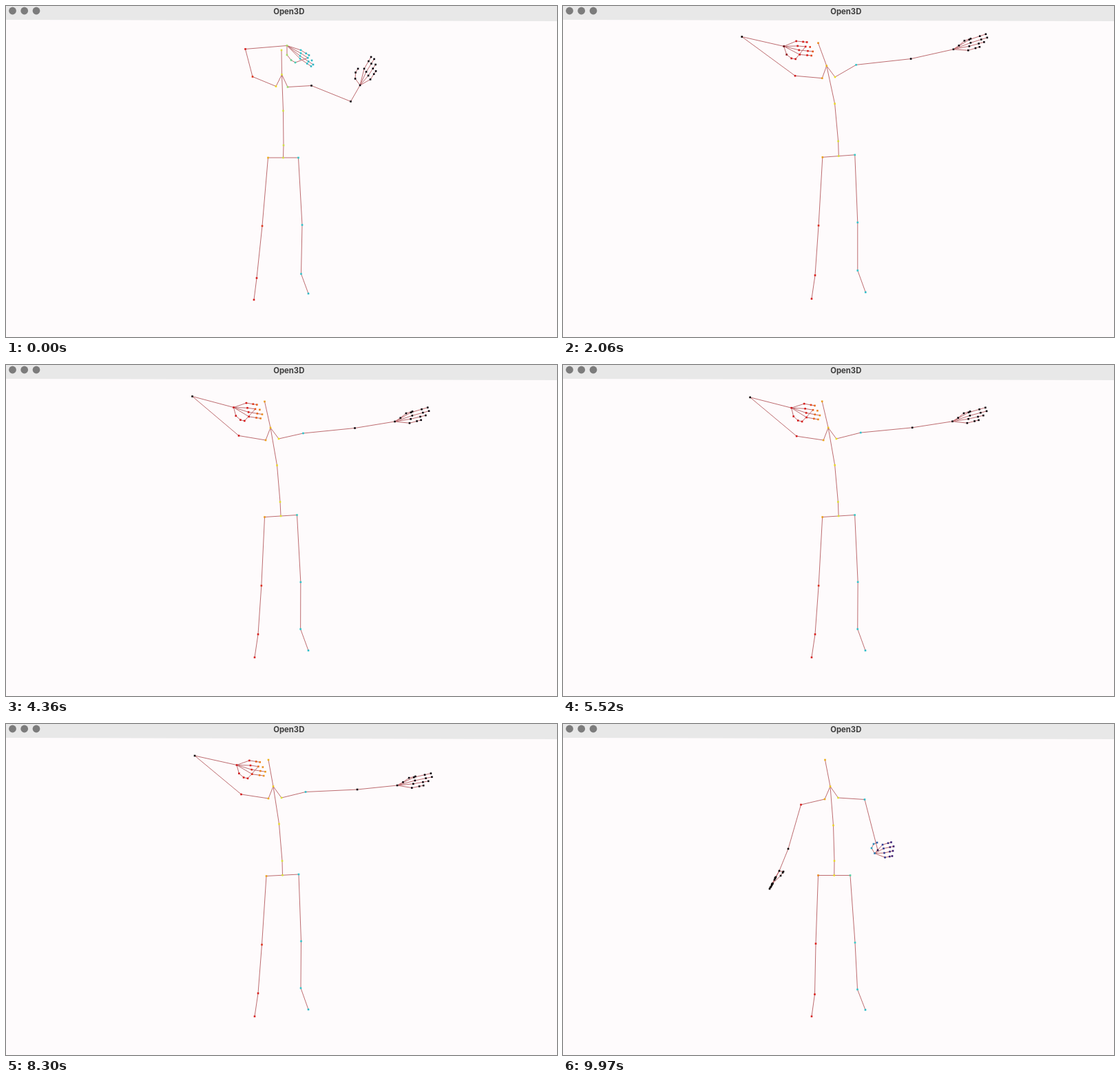
An HTML page with a canvas for the animation above (10 s loop, 800x480 px).

```html
<!DOCTYPE html>
<html lang="en">
<head>
<meta charset="utf-8">
<title>Open3D</title>
<style>
  html, body { margin: 0; width: 100%; height: 100%; overflow: hidden; background: #fefbfc; }
  canvas { display: block; }
</style>
</head>
<body>
<canvas id="stage" width="800" height="480"></canvas>
<script>
const ctx = document.getElementById('stage').getContext('2d');
const LOOP = 10000;

// Hand shapes relative to the wrist: three thumb joints, then base and tip of four fingers.
const rightRaised = [0, 13.5, 6, 21, 12, 24.5, 20, 6.5, 32, 14, 20, 11, 36, 21.5, 19, 15, 38, 27.5, 19, 19, 35, 30];
const rightOpen = [4, 12, 11, 17.5, 17, 18.5, 18, -7.5, 33.5, -6, 20, -.5, 38, 1, 22, 5.5, 42, 7.5, 23, 12, 40, 13.5];
const rightDown = [6, 1, 5, 2.5, 2, 7, -5, 9, -14, 26, -6, 10, -13, 24, -6, 11, -12, 23, -7, 13, -11, 21];
const leftRaised = [-7, -9.5, -6.5, -18.5, -3, -24, 6, -24, 16, -41, 9, -19.5, 20.5, -38, 12, -14, 22.5, -30, 15, -8.5, 23, -20.5];
const leftOpen = [8, -5.5, 16, -12.5, 25, -15.5, 23, -14, 47, -22, 25, -9.5, 49, -17, 23, -4.5, 44.5, -10.5, 21.5, 1.5, 38, -3.5];
const leftDown = [-4.5, -7.5, -1.5, -13.5, 3.5, -15.5, 11.5, -12.5, 24, -16, 13, -7, 27.5, -10, 14, -.5, 26.5, -3.5, 15, 6, 25.5, 4];

function turn(hand, degrees) {
  const c = Math.cos(degrees * Math.PI / 180), s = Math.sin(degrees * Math.PI / 180);
  return hand.map((v, i) => i % 2 ? hand[i - 1] * s + v * c : v * c - hand[i + 1] * s);
}

// Joints are [x, y, colour shift]; a joint missing from a pose moves straight through it.
const poses = [
  [0, {
    head: [400, 64], neck: [400.5, 99.5], chest: [402.5, 152], belly: [403, 202],
    rCollar: [392, 116.5], rShoulder: [358, 102.5], rElbow: [347.5, 62.5], rWrist: [408, 57.5],
    lCollar: [409, 117.5], lShoulder: [443.5, 115.5, 70], lElbow: [500.5, 138.5], lWrist: [514, 115],
    rHip: [380.5, 220], rKnee: [372, 319], rAnkle: [364, 394.5], rToe: [360, 426],
    lHip: [424.5, 220], lKnee: [430, 317.5], lAnkle: [428.5, 388.5], lToe: [439, 417],
    rHand: rightRaised, lHand: leftRaised
  }],
  [1030, { rShoulder: [348, 94], rElbow: [346.5, 10] }],
  [1210, {
    head: [368.5, 55.5], neck: [382.5, 84], chest: [395.5, 139], belly: [400.5, 194],
    rCollar: [376.5, 102], rShoulder: [338, 85, -40], rElbow: [329, 2], rWrist: [386.5, 9.5],
    lCollar: [394.5, 101], lShoulder: [422, 79], lElbow: [494, 47.5], lWrist: [556, 13],
    rHip: [377.5, 217.5], rKnee: [371.5, 317], rAnkle: [366, 390.5], rToe: [361, 425],
    lHip: [424, 214.5], lKnee: [428, 313], lAnkle: [428, 384], lToe: [439.5, 416],
    rHand: rightOpen, lHand: leftOpen
  }],
  [1950, { rShoulder: [337, 101], rElbow: [259, 44], rWrist: [320, 58], lElbow: [505, 76], lWrist: [567, 62] }],
  [3090, {
    head: [373, 51.5], neck: [383, 90], chest: [393.5, 145], belly: [398.5, 198.5],
    rCollar: [376, 108], rShoulder: [337, 103.5], rElbow: [266.5, 50], rWrist: [327, 62.5],
    lCollar: [395.5, 105.5], lShoulder: [430, 93], lElbow: [506, 82], lWrist: [565.5, 70.5],
    rHip: [376, 221.5], rKnee: [370.5, 320], rAnkle: [366, 390.5], rToe: [361, 424],
    lHip: [423.5, 217.5], lKnee: [427.5, 315], lAnkle: [427.5, 383], lToe: [439, 414],
    rHand: rightOpen, lHand: leftOpen
  }],
  [4360, {
    head: [375.5, 53], neck: [384, 91], chest: [393.5, 145.5], belly: [398, 198.5],
    rCollar: [377, 109], rShoulder: [338, 102.5], rElbow: [270.5, 45.5], rWrist: [330.5, 61.5],
    lCollar: [396, 107], lShoulder: [431.5, 99], lElbow: [506.5, 91.5], lWrist: [564.5, 82],
    rHip: [375.5, 220.5], lHip: [422.5, 217.5],
    rHand: turn(rightOpen, 3.5), lHand: turn(leftOpen, 2)
  }],
  [6880, {
    head: [377, 52.5], neck: [386.5, 91], chest: [396, 145], belly: [401, 198.5],
    rCollar: [379.5, 109], rShoulder: [340.5, 104], rElbow: [273, 48.5], rWrist: [333, 63],
    lCollar: [398, 107], lShoulder: [433, 97], lElbow: [508, 90], lWrist: [566.5, 81.5],
    rHip: [378, 220.5], rKnee: [371.5, 320], lHip: [425, 217.5], lKnee: [428.5, 314.5],
    rHand: turn(rightOpen, 6), lHand: turn(leftOpen, 3)
  }],
  [8300, {
    head: [381, 52], neck: [388, 90.5], chest: [396.5, 145], belly: [401, 198.5],
    rCollar: [381, 108], rShoulder: [341.5, 102], rElbow: [274, 46], rWrist: [335, 59.5],
    lCollar: [400, 107], lShoulder: [435, 98.5], lElbow: [510, 95], lWrist: [568, 89],
    rHip: [378, 220.5], rKnee: [371.5, 320], rAnkle: [366, 390.5], rToe: [361, 424],
    lHip: [425, 218], lKnee: [428.5, 315], lAnkle: [428, 383], lToe: [439, 414],
    rHand: turn(rightOpen, 3), lHand: turn(leftOpen, 5.5)
  }],
  [8800, { rElbow: [274, 50], rWrist: [332, 66], lElbow: [512, 100], lWrist: [574, 104] }],
  [9300, { rShoulder: [343, 112], rElbow: [303, 140], rWrist: [325, 172], lElbow: [492, 135], lWrist: [508, 138] }],
  [9970, {
    head: [380.5, 52], neck: [388, 90.5], chest: [392.5, 147], belly: [394, 198.5],
    rCollar: [380, 109], rShoulder: [345.5, 117], rElbow: [327, 181, -30], rWrist: [314, 213, -20],
    lCollar: [399.5, 107], lShoulder: [438, 109.5], lElbow: [457, 183, 30], lWrist: [452.5, 187.5],
    rHip: [370.5, 219.5], rKnee: [367, 318.5], rAnkle: [365.5, 392], rToe: [361, 424],
    lHip: [417, 219.5], lKnee: [424, 317], lAnkle: [427.5, 385], lToe: [439, 414.5],
    rHand: rightDown, lHand: leftDown
  }]
];

const chains = [
  'head neck chest belly pelvis', 'rHip pelvis lHip',
  'neck rCollar rShoulder rElbow rWrist', 'neck lCollar lShoulder lElbow lWrist',
  'rHip rKnee rAnkle rToe', 'lHip lKnee lAnkle lToe'
].map(chain => chain.split(' '));

// Joint colour depends on the horizontal position.
const ramp = [
  [300, 10, 0, 0], [320, 90, 10, 15], [330, 205, 25, 30], [355, 220, 30, 25], [368, 235, 125, 30],
  [382, 235, 180, 30], [396, 235, 225, 40], [405, 200, 225, 80], [415, 90, 210, 150],
  [425, 50, 200, 205], [446, 40, 180, 195], [458, 45, 75, 165], [480, 60, 25, 110], [500, 12, 5, 12]
];

const tracks = {};
for (const [time, pose] of poses)
  for (const name in pose) (tracks[name] ||= []).push([time, pose[name]]);

const mix = (a, b, k) => a.map((v, i) => v + ((b[i] || 0) - v) * k);

function sample(keys, t) {
  const next = keys.findIndex(key => key[0] > t);
  if (next < 0) return keys[keys.length - 1][1];
  if (next === 0) return keys[0][1];
  const [t0, a] = keys[next - 1], [t1, b] = keys[next];
  return mix([a[0], a[1], ...(a.length > 2 ? a.slice(2) : [0])], b, (t - t0) / (t1 - t0));
}

const rampKeys = ramp.map(([x, ...rgb]) => [x, rgb]);

function dot([x, y, shift = 0]) {
  const legShift = y > 300 && x < 400 ? -14 : 0;
  ctx.fillStyle = `rgb(${sample(rampKeys, x + shift + legShift).map(Math.round)})`;
  ctx.fillRect(x - 1.3, y - 1.3, 2.6, 2.6);
}

function line(points) {
  ctx.beginPath();
  for (const [x, y] of points) ctx.lineTo(x, y);
  ctx.stroke();
}

function drawHand(wrist, shape, isRight) {
  const at = i => [wrist[0] + shape[2 * i], wrist[1] + shape[2 * i + 1], wrist[2]];
  const thumb = [at(0), at(1), at(2)];
  const fingers = [3, 5, 7, 9].map(i => {
    const base = at(i), tip = at(i + 1);
    return [base, mix(base.slice(0, 2), tip, .64).concat(wrist[2] || 0), tip];
  });
  // On the right hand the middle fingertip is loose and the thumb joins that finger.
  fingers.forEach((finger, i) => line([wrist, ...(isRight && i === 1 ? finger.slice(0, 2) : finger)]));
  line([wrist, ...thumb, ...(isRight ? [fingers[1][1]] : [])]);
  [thumb, ...fingers].flat().forEach(dot);
}

function drawWindowBar() {
  ctx.fillStyle = '#e8e8e8';
  ctx.beginPath();
  for (const [x, y] of [[0, 0], [800, 0], [800, 22], [0, 20]]) ctx.lineTo(x, y);
  ctx.fill();
  ctx.fillStyle = '#7c7c7c';
  for (const x of [9.5, 26.7, 44]) {
    ctx.beginPath();
    ctx.arc(x, 7, 5.4, 0, 7);
    ctx.fill();
  }
  ctx.fillStyle = '#3d3d3d';
  ctx.font = '700 11.3px Inter, sans-serif';
  ctx.textAlign = 'center';
  ctx.textBaseline = 'alphabetic';
  ctx.fillText('Open3D', 410.8, 12);
}

function frame(now) {
  const t = now % LOOP, body = {};
  for (const name in tracks) body[name] = sample(tracks[name], t);
  body.pelvis = mix(body.rHip.slice(0, 2), body.lHip, .5);

  ctx.fillStyle = '#fefbfc';
  ctx.fillRect(0, 0, 800, 480);
  ctx.strokeStyle = '#bd6c70';
  ctx.lineWidth = 1;
  for (const chain of chains) line(chain.map(name => body[name]));
  drawHand(body.rWrist, body.rHand, true);
  drawHand(body.lWrist, body.lHand, false);
  for (const name in body) if (!name.endsWith('Hand')) dot(body[name]);
  drawWindowBar();
  requestAnimationFrame(frame);
}
requestAnimationFrame(frame);
</script>
</body>
</html>
```
